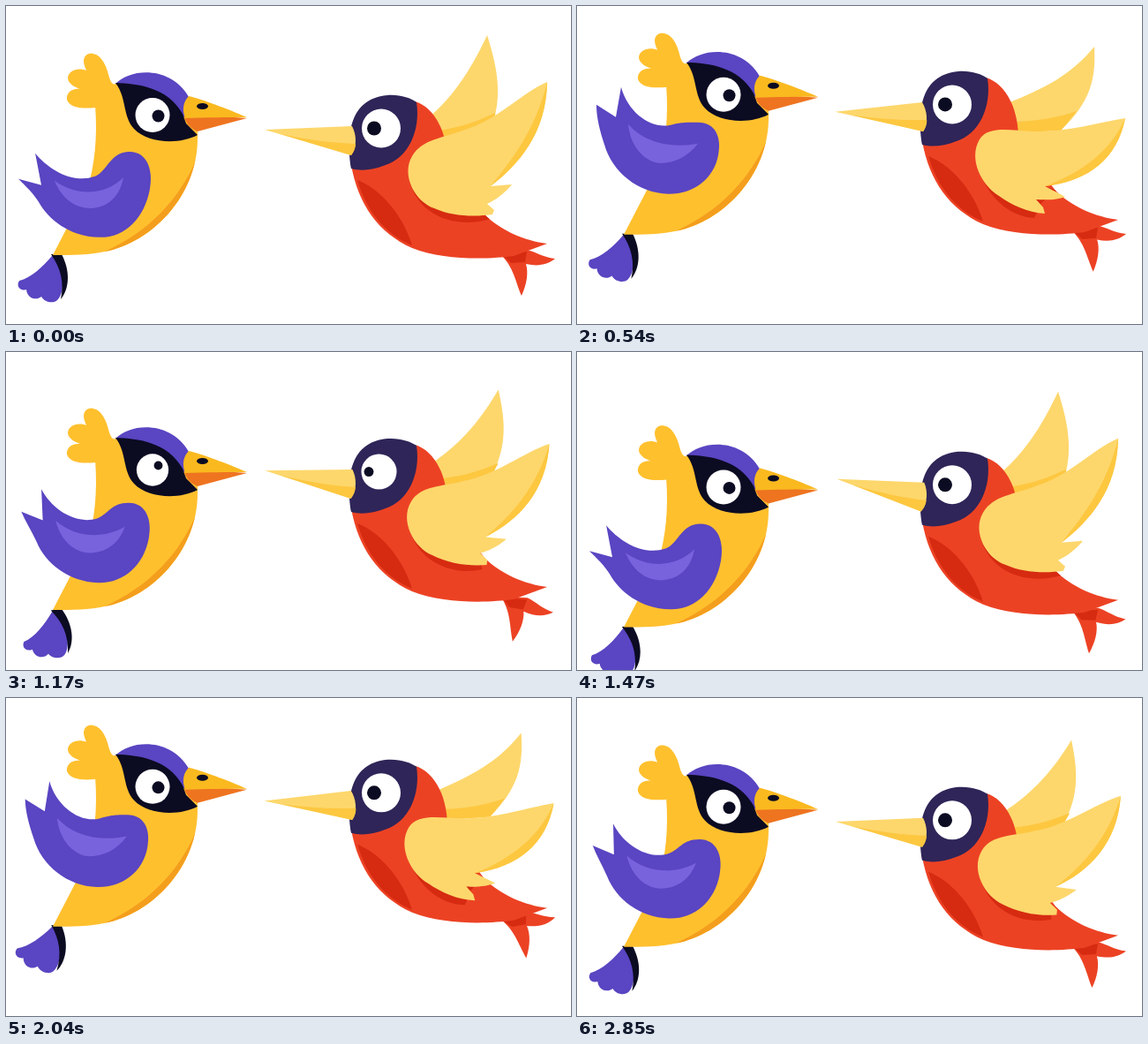
Recreate the animation shown at these times as an HTML page with a canvas. Size 640x360 px, loop 2.88 s.

```html
<!DOCTYPE html>
<html lang="en">
<head>
<meta charset="utf-8">
<title>Two birds</title>
<style>
html, body { margin: 0; width: 100%; height: 100%; overflow: hidden; background: #fff; }
canvas { display: block; width: 640px; height: 360px; }
</style>
</head>
<body>
<canvas id="stage" width="640" height="360"></canvas>
<script>
const ctx = document.getElementById('stage').getContext('2d');
const STEP = 30, STEPS = 96;

const C = {
  yellow: '#ffc02e', amber: '#f49e1d', purple: '#5a45c2', lilac: '#7963dd', ink: '#0b0b22',
  honey: '#fab91f', orange: '#ee7420', red: '#ec4224', crimson: '#d62b11', navy: '#2f2558',
  cream: '#fdd76c', gold: '#fdc740'
};

// Shapes with two strings are blended between wing down and wing up.
const left = {
  tail: 'M52,283 C42,295 28,308 15,311 C11,317 16,323 23,321 C24,331 34,334 40,329 C44,336 54,337 58,333 C67,325 66,300 56,282 Z',
  tailEdge: 'M51,281 L63,281 C73,300 72,320 62,332 C66,312 62,297 51,281 Z',
  crest: 'M126,90 C114,88 119,74 108,60 C102,52 89,51 88,62 C88,67 90,70 91,73 C82,69 70,73 70,82 C71,89 79,92 84,94 C74,93 68,99 69,106 C73,117 90,116 102,115 L130,125 Z',
  body: 'M101,112 C104,150 100,180 93,205 L53,282 C75,282 95,282 112,278 C165,268 217,215 217,150 L217,140 C215,100 180,80 150,80 L118,90 Z',
  shade: 'M217,170 C197,219 162,255 112,278 L220,280 Z',
  cap: 'M124,88 C142,70 187,68 207,103 L202,126 C186,110 156,104 124,88 Z',
  mask: 'M124,87 C150,88 183,92 200,122 L204,133 L217,146 C197,157 161,156 145,139 C132,125 137,104 124,87 Z',
  beakTop: 'M207,102 C223,106 250,116 273,126 C252,126 225,126 203,127 C199,117 201,108 207,102 Z',
  beakLow: 'M202,124 C225,124 250,125 273,127 L217,142 C208,138 203,132 202,124 Z',
  wing: [
    'M33,167 C48,185 75,202 101,193 C115,187 118,165 140,165 C160,165 167,186 163,207 C157,240 135,263 105,262 C72,261 48,242 37,222 C31,212 22,204 14,196 L40,203 Z',
    'M50,115 C58,145 85,163 106,158 C118,155 120,155 137,155 C157,155 164,172 160,192 C155,220 130,237 103,236 C70,235 40,212 31,180 C26,165 22,150 22,135 L44,149 Z'
  ],
  gloss: [
    'M55,198 C80,216 112,215 133,194 C128,222 108,230 92,229 C74,227 62,215 55,198 Z',
    'M58,157 C75,177 105,185 137,179 C125,195 108,202 92,201 C74,198 60,180 58,157 Z'
  ]
};

const right = {
  tail: 'M560,281 C575,295 577,312 584,328 C590,315 592,302 589,292 C603,295 613,293 622,286 C607,284 602,279 590,276 Z',
  tailShade: 'M562,282 L590,278 L588,290 L572,291 Z',
  body: 'M391,180 C399,225 422,257 460,274 C495,288 545,287 575,283 L613,269 C588,266 560,254 542,236 L500,180 C501,146 487,115 463,108 Z',
  belly: 'M398,197 C420,205 448,232 460,271 C430,259 408,232 398,197 Z',
  head: 'M391,184 C386,152 386,105 432,101 C446,100 458,104 465,109 C470,142 455,172 430,180 C415,186 402,187 391,184 Z',
  beak: 'M293,140 L392,136 C397,145 398,160 391,169 Z',
  beakShade: 'M311,145 C345,152 370,155 396,156 C396,161 394,165 391,169 Z',
  back: [
    'M545,33 C555,65 562,95 553,128 L490,153 L480,125 C510,100 530,65 545,33 Z',
    'M586,73 C588,110 582,135 548,168 L500,170 L488,137 C530,120 560,105 586,73 Z'
  ],
  backShade: [
    'M554,121 L553,128 L490,153 L488,141 C515,138 535,130 554,121 Z',
    'M566,146 L548,168 L500,170 L495,158 C525,157 545,153 566,146 Z'
  ],
  shadow: [
    'M456,192 C462,234 505,254 549,241 L540,225 L480,190 Z',
    'M454,206 C462,242 490,266 518,267 L526,250 L544,236 L480,200 Z'
  ],
  wing: [
    'M613,86 C585,98 555,130 520,140 C495,150 472,150 460,170 C447,192 464,222 485,229 C505,238 530,239 551,236 L553,231 L545,224 C560,217 568,208 573,202 L549,204 C580,180 612,145 613,86 Z',
    'M621,154 C585,160 555,170 515,169 C492,168 466,162 456,178 C443,200 458,230 478,242 C492,252 510,261 530,262 L528,255 L520,246 C535,247 545,246 553,243 L530,231 C580,225 612,200 621,154 Z'
  ],
  rim: [
    'M613,86 C612,145 580,180 549,204 C572,176 600,140 613,86 Z',
    'M621,154 C612,200 580,225 530,231 C575,214 605,190 621,154 Z'
  ]
};

function fill(shape, color) {
  ctx.fillStyle = color;
  ctx.fill(new Path2D(shape));
}

function fillInside(outer, shape, color) {
  ctx.save();
  ctx.clip(new Path2D(outer));
  fill(shape, color);
  ctx.restore();
}

function blend([a, b], u) {
  const to = b.match(/\d+/g);
  let i = 0;
  return a.replace(/\d+/g, n => (+n + (to[i++] - n) * u).toFixed(2));
}

function dot(x, y, rx, ry, color) {
  ctx.fillStyle = color;
  ctx.beginPath();
  ctx.ellipse(x, y, rx, ry, 0, 0, Math.PI * 2);
  ctx.fill();
}

function turn(x, y, angle, draw) {
  ctx.save();
  ctx.translate(x, y);
  ctx.rotate(angle);
  ctx.translate(-x, -y);
  draw();
  ctx.restore();
}

const rad = d => d * Math.PI / 180;
const bump = (f, c) => Math.exp(-(((f - c) / 4) ** 2));

// The second half of the loop runs back through the first.
const mirror = f => 48 - Math.abs(48 - (f + STEPS) % STEPS);

// Cosine easing through [time, value] pairs.
function track(m, keys) {
  let i = 1;
  while (i < keys.length - 1 && m > keys[i][0]) i++;
  const [t0, v0] = keys[i - 1], [t1, v1] = keys[i];
  const s = Math.min(1, Math.max(0, (m - t0) / (t1 - t0)));
  return v0 + (v1 - v0) * (1 - Math.cos(Math.PI * s)) / 2;
}

function flap(f) {
  const wave = (1 - Math.cos(Math.PI * (f - 0.5) / 6)) / 2;
  const u = f > 90 ? Math.max(wave, 0.41) : wave;
  return u * u * (3 - 2 * u);
}

function drawLeft(f, swing) {
  const u = flap(f) ** 0.75;
  const a = bump(f, 9), b = bump(f, 39), c = bump(f, 79), open = bump(f, 27);
  ctx.save();
  ctx.translate(0, track(mirror(f - 0.5), [[0, 0], [24, -28], [48, 29.5]]));
  turn(60, 283, rad(-1.25 * swing), () => {
    fill(left.tail, C.purple);
    fill(left.tailEdge, C.ink);
  });
  fill(left.crest, C.yellow);
  fill(left.body, C.yellow);
  fillInside(left.body, left.shade, C.amber);
  fill(left.cap, C.purple);
  fill(left.mask, C.ink);
  turn(206, 125, rad(3 * open), () => fill(left.beakLow, C.orange));
  turn(206, 125, rad(-open), () => {
    fill(left.beakTop, C.honey);
    dot(222.5, 113.5, 6.5, 3.5, C.ink);
  });
  const r = 19.5 * (1 - 0.13 * a - 0.07 * (b + c));
  dot(166, 123.5, r, r, '#fff');
  const p = 7 * (1 - 0.5 * a - 0.3 * b - 0.15 * c);
  dot(172.5, 124.5 - 6 * b + 2 * open, p, p, C.ink);
  fill(blend(left.wing, u), C.purple);
  fill(blend(left.gloss, u), C.lilac);
  ctx.restore();
}

function drawRight(f, swing) {
  const u = flap(f), a = bump(f, 9), b = bump(f, 39), c = bump(f, 79);
  const m = mirror(f);
  ctx.save();
  ctx.translate(0, track(m, [[0, 0], [25, -33], [48, 12]]));
  turn(566, 282, rad(1.6 * swing), () => {
    fill(right.tail, C.red);
    fill(right.tailShade, C.crimson);
  });
  fill(blend(right.back, u), C.cream);
  fill(blend(right.backShade, u), C.gold);
  fill(right.body, C.red);
  fill(right.belly, C.crimson);
  fillInside(right.body, blend(right.shadow, u), C.crimson);
  fill(right.head, C.navy);
  const droop = track(m, [[0, 0], [25, 8], [48, -8]]);
  turn(393, 152, -droop / 98, () => {
    fill(right.beak, C.cream);
    fill(right.beakShade, C.gold);
  });
  const r = 22 * (1 - 0.13 * a - 0.09 * b - 0.18 * c);
  dot(425 - 2.5 * b, 138.5, r, r, '#fff');
  const p = 8 * (1 - 0.5 * a - 0.32 * b - 0.7 * c);
  dot(417 - 6 * b + 3 * bump(f, 28), 138.5, p, p, C.ink);
  fill(blend(right.wing, u), C.cream);
  fill(blend(right.rim, u), C.gold);
  ctx.restore();
}

function frame(now) {
  const f = Math.floor(now / STEP) % STEPS;
  const swing = track(mirror(f - 0.5), [[0, 0], [10, 7.5], [24, -7], [40, 8], [48, 3]]);
  ctx.clearRect(0, 0, 640, 360);
  drawLeft(f, swing);
  drawRight(f, swing);
}

const start = performance.now();
function loop() {
  frame(performance.now() - start);
  requestAnimationFrame(loop);
}
loop();
</script>
</body>
</html>
```
